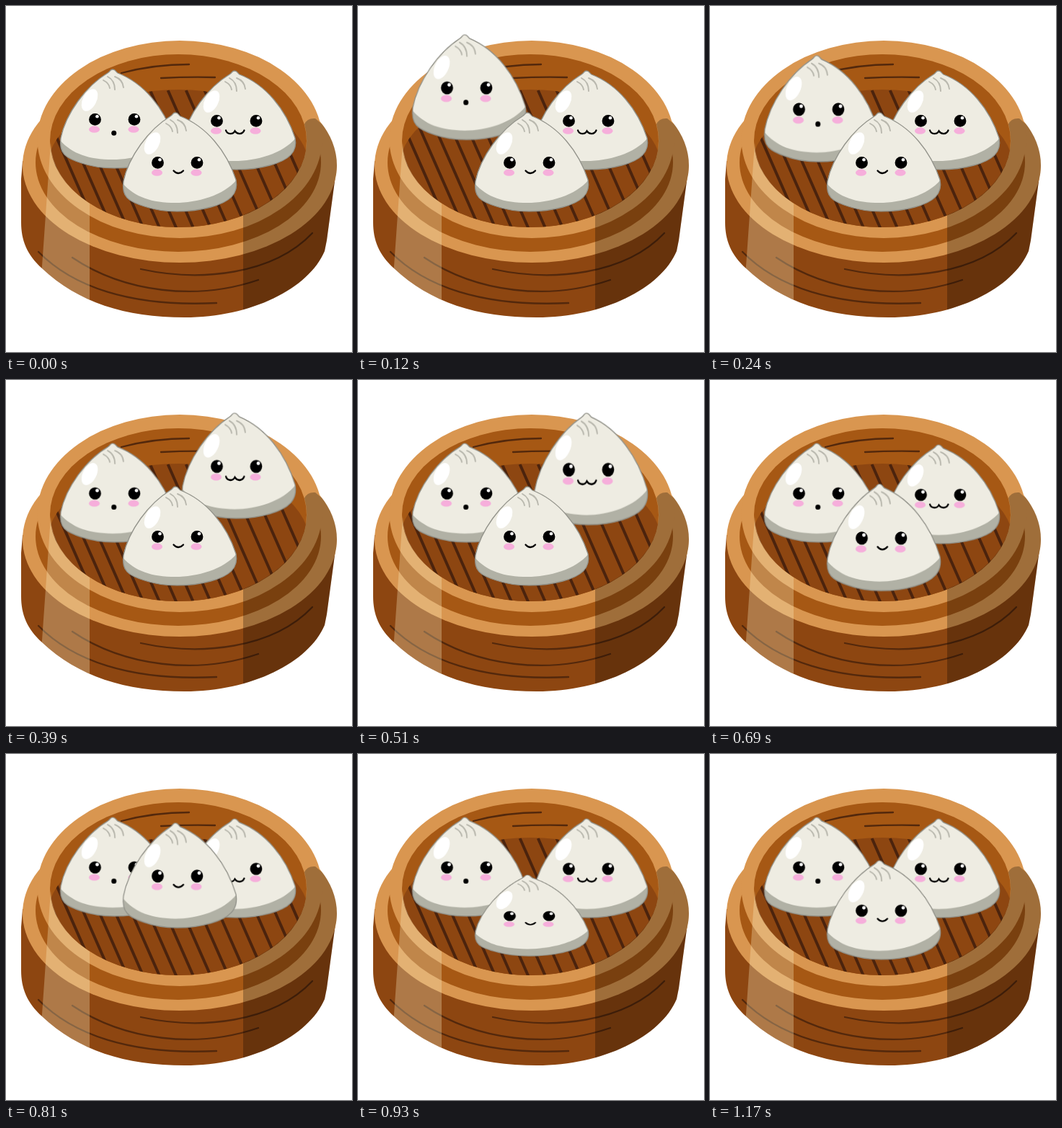
Animation, 480 px wide and 480 px high, one loop 1800 ms. Source, as an HTML page:

```html
<!DOCTYPE html>
<html lang="en">
<head>
<meta charset="utf-8">
<title>Steamed buns</title>
<style>
  html, body { margin: 0; width: 100%; height: 100%; overflow: hidden; background: #fff; }
  svg { display: block; width: 100vw; height: 100vh; }
  .grain { fill: none; stroke: #53280c; stroke-width: 2.3; stroke-linecap: round; }
  .mouth { fill: none; stroke: #000; stroke-width: 2.3; stroke-linecap: round; }

  .hop { animation: hop 1800ms steps(1) var(--delay, 0ms) infinite; }
  .right { --delay: 300ms; }
  .front { --delay: 660ms; }

  /* Poses advance every 30 ms; steps(2) spans 60 ms. */
  @keyframes hop {
    0%     { transform: translateY(0) scaleY(1); }
    1.66%  { transform: translateY(2px) scaleY(1.08); }
    3.33%  { transform: translateY(-20px) scaleY(1.08); }
    4.99%  { transform: translateY(-39.5px) scaleY(1.066); animation-timing-function: steps(2); }
    8.33%  { transform: translateY(-48px) scaleY(1.06); animation-timing-function: steps(2); }
    11.66% { transform: translateY(-35px) scaleY(1.13); }
    13.33% { transform: translateY(-14px) scaleY(1.075); }
    14.99% { transform: translateY(7.5px) scaleY(.82); animation-timing-function: steps(2); }
    18.33% { transform: translateY(2.5px) scaleY(.95); animation-timing-function: steps(2); }
    21.66%, 100% { transform: translateY(0) scaleY(1); }
  }
</style>
</head>
<body>
<svg viewBox="0 0 480 480">
  <defs>
    <path id="wall" d="M23 215L21 240V300C21 325 29 345 50 364C100 411 165 432 248 432C340 432 420 392 442 340L445 325L459 221Z"/>
    <clipPath id="inside"><ellipse cx="239" cy="187" rx="178" ry="120"/></clipPath>
    <clipPath id="floor" clip-path="url(#inside)"><ellipse cx="239" cy="226" rx="182" ry="110"/></clipPath>
    <clipPath id="basket">
      <ellipse cx="241" cy="185" rx="197.5" ry="137"/>
      <ellipse cx="241" cy="221" rx="218" ry="135"/>
      <use href="#wall"/>
    </clipPath>
    <path id="shape" d="M-12-64C-8-66-9-69-5-69C-1-69-1-66 2-64C38-50 66-16 79 24C83 44 70 55 44 62C14 70-22 70-48 61C-70 54-80 48-77 26C-70-8-42-46-12-64Z"/>
    <clipPath id="dough"><use href="#shape"/></clipPath>
    <g id="bun">
      <use href="#shape" fill="#b1b1a5"/>
      <path clip-path="url(#dough)" fill="#eeece2" d="M-90-80H90V24H80C62 46 25 56-5 56C-38 56-62 48-79 28H-90Z"/>
      <use href="#shape" fill="none" stroke="#92928a" stroke-width="1.3"/>
      <ellipse cx="-37" cy="-26.5" rx="9.5" ry="16.5" transform="rotate(27 -37 -26.5)" fill="#fff"/>
      <path fill="none" stroke="#b9b8ae" stroke-width="1.9" stroke-linecap="round"
        d="M-18-54Q-10-50-9-43M-12-59Q-2-54-2-41M-2-59Q9-55 10-44"/>
      <g id="eye">
        <circle cx="-29.5" cy=".4" r="8.4"/>
        <circle cx="-26.5" cy="-3.8" r="2.3" fill="#fff"/>
        <ellipse cx="-30.5" cy="14.2" rx="7.5" ry="4.6" fill="#f6aedb"/>
      </g>
      <use href="#eye" x="54.5"/>
    </g>
  </defs>

  <use href="#wall" fill="#8d4611"/>
  <ellipse cx="241" cy="221" rx="218" ry="135" fill="#d99650"/>
  <ellipse cx="239" cy="217" rx="198" ry="124" fill="#a65814"/>
  <ellipse cx="241" cy="185" rx="197.5" ry="137" fill="#d99650"/>
  <ellipse cx="239" cy="187" rx="178" ry="120" fill="#a65814"/>
  <g clip-path="url(#floor)">
    <path fill="#8d4611" d="M50 100H430V320H50Z"/>
    <path id="slats" stroke="#4b230d" stroke-width="4"/>
  </g>
  <path class="grain" d="M160 93Q205 81 254 81M215 100Q255 98 290 99M45 341C91 388 170 418 292 412M92 349C165 398 265 409 350 380M187 365C270 383 370 373 425 315"/>
  <g clip-path="url(#basket)">
    <path fill="#f8ecc0" fill-opacity=".31" d="M62 190L49 375L116 430V274A178 120 0 0 1 62 190Z"/>
    <path fill-opacity=".27" d="M329 290A178 120 0 0 0 414 164Q418 155 429 156L470 190V440H329Z"/>
  </g>

  <g transform="translate(153 157)"><g class="hop">
    <use href="#bun"/>
    <circle cx="-3.3" cy="19.3" r="3.5"/>
  </g></g>
  <g transform="translate(322 159)"><g class="hop right">
    <use href="#bun"/>
    <path class="mouth" d="M-17 13.5C-15 19.5-7 19.5-4.5 14.5C-1 19.5 6 19.5 8.5 13.5"/>
  </g></g>
  <g transform="translate(240 217)"><g class="hop front">
    <use href="#bun"/>
    <path class="mouth" d="M-7.5 11.5Q-1 18.5 6 11.5"/>
  </g></g>
</svg>
<script>
  // Slats run parallel, spaced slightly wider towards the right.
  let d = '';
  for (let i = -8; i < 8; i++) d += `M${200 + 24.4 * i + 0.25 * i * i} 117l88 200`;
  document.getElementById('slats').setAttribute('d', d);
</script>
</body>
</html>
```
